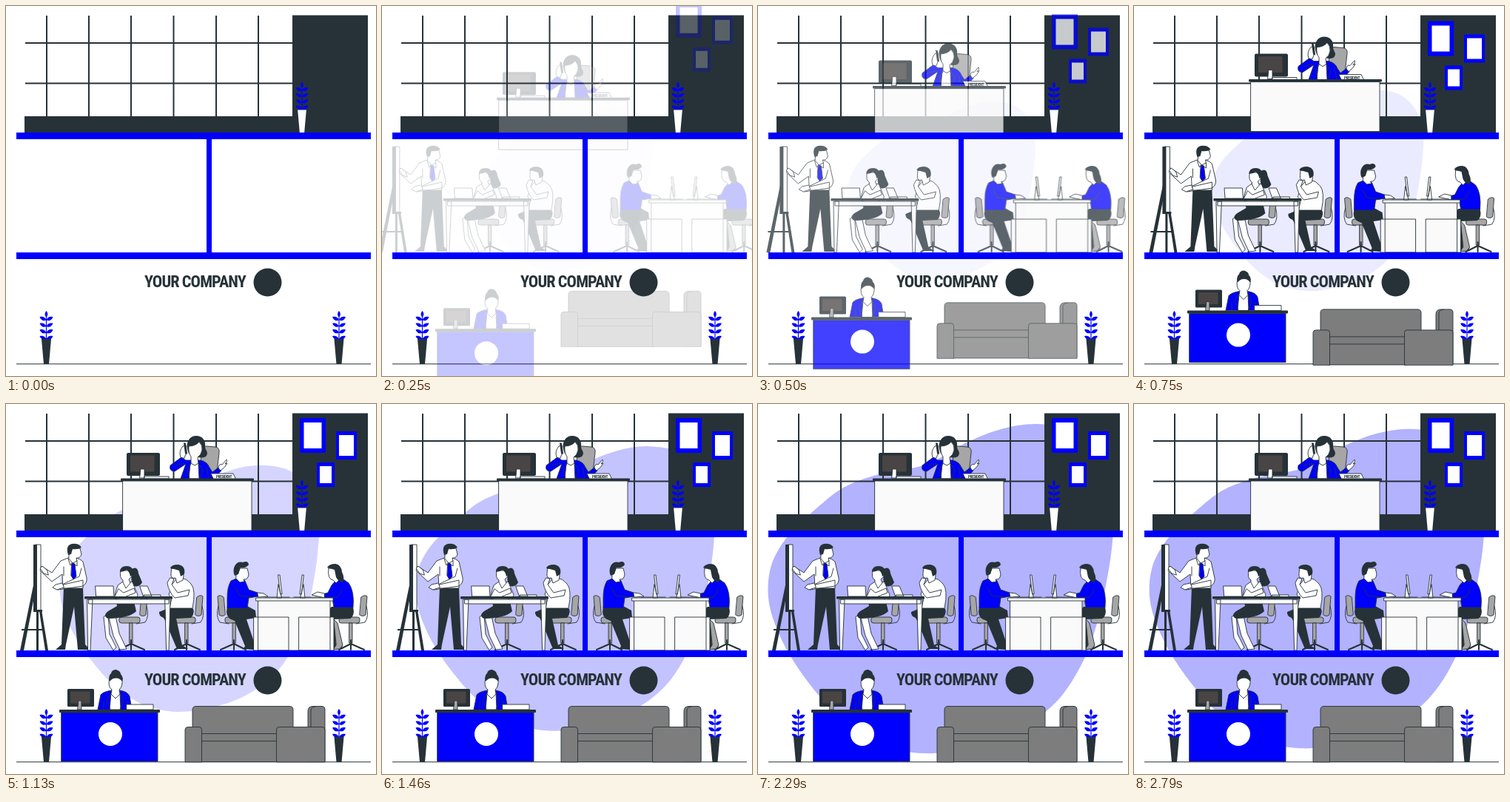
Animation, 500 px wide and 500 px high, one loop 2.83 s. Source, as an HTML page:

```html
<!DOCTYPE html>
<html lang="en">
<head>
<meta charset="utf-8">
<title>Office</title>
<style>
html, body { margin: 0; width: 100%; height: 100%; overflow: hidden; background: #fff; }
svg { display: block; width: 100vw; height: 100vh; }
.d { fill: #263238; }
.b { fill: #00f; }
.w { fill: #fff; }
.g { fill: #a6a6a6; }
.s { fill: #7d7d7d; }
.p { fill: #fafafa; }
.m { fill: #4a4545; }
.o { stroke: #263238; stroke-width: .9; stroke-linejoin: round; stroke-linecap: round; }
.l { fill: none; }
.title { font: 700 29px "Roboto Condensed", "Open Sans Condensed", Roboto, sans-serif; font-stretch: 75%; letter-spacing: -.04em; }
.plate { font: 700 5px "Roboto Condensed", "Open Sans Condensed", Roboto, sans-serif; font-stretch: 75%; letter-spacing: -.04em; }
</style>
</head>
<body>
<svg viewBox="0 0 500 500">
<defs>
  <g id="leaves" class="b">
    <path id="pair" d="M0-34C-2-38-5-39-9-38C-7-33-3-32 0-34C2-38 5-39 9-38C7-33 3-32 0-34Z"/>
    <use href="#pair" y="-8.6"/>
    <use href="#pair" y="-17.2"/>
    <use href="#pair" y="-25.8"/>
    <path d="M0-63C-3-67-2-69 0-72C2-69 3-67 0-63ZM-.6-64H.6V-33H-.6Z"/>
  </g>
  <path id="vase" d="M-6.5-34H6.5L3.5 0H-3.5Z"/>
  <!-- office chair, backrest on the right, floor at y = 0 -->
  <g id="chair" class="o">
    <path class="g" d="M12-72Q17-76 20-73L18-48Q14-45 10-48Z"/>
    <path class="l" d="M19-60Q23-46 17-38L5-36"/>
    <rect class="g" x="-18" y="-45" width="28" height="8" rx="3"/>
    <path class="g" d="M-4-37H0V-10H-4Z"/>
    <path class="l" stroke-width="2" d="M-2-14V-1M-18-1L-2-9L16-1"/>
  </g>
</defs>

<path id="blob" class="b"/>

<path class="l" stroke="#263238" stroke-width="2" d="M55 13V150M112 13V150M169 13V150M226.5 13V150M284 13V150M341 13V150M26 50H388M26 104.5H388"/>
<path class="d" d="M25 149H387V12.500H489V172H25Z"/>
<use href="#leaves" transform="translate(400 171) scale(.95)"/>
<use href="#vase" class="w" transform="translate(400 171) scale(.9)"/>

<g data-move="0 -30">
  <path class="b" d="M397 19H432V66H397ZM446 37H474V75H446ZM420 79H444V112H420Z"/>
  <path class="w" d="M402.500 25H426.500V60H402.500ZM450 42H470V70H450ZM424 84H440V107H424Z"/>
</g>

<g data-move="0 30">
  <path class="g o" d="M264 64Q264 56 271 57L283 58Q289 59 288 66L284 101H262Z"/>
  <path class="d" d="M245 61C243 50 249 43 257 43C266 43 270 50 269 57C269 63 275 65 270 71Q264 74 258 71L247 67Z"/>
  <path class="b o" d="M236 101L243 81L228 91Q220 91 222 83L237 72L243 76L250 76L263 76Q272 78 275 86L279 92L288 85L291 90L281 101Z"/>
  <path class="w o" d="M249 81L247 101H261L260 80L255 77Z"/>
  <path class="w o" d="M247 57Q256 57 261 51Q266 56 265 62Q264 69 259 72L260 80L255 83L250 80V71Q246 66 247 57Z"/>
  <path class="w o" d="M236 72Q233 64 239 57L243 56L244 65L241 73Z"/>
  <path class="d" d="M240 52L243 53L245 68L242 67Z"/>
  <path class="w o" d="M287 86Q288 80 292 82L298 75Q300 77 296 81L299 80Q297 85 290 90Z"/>
  <path class="l o" d="M250 81L245 89L248 101M260 80L266 89L262 101M229 83L241 80M271 86L274 100"/>
  <rect class="d" x="163" y="66" width="45" height="31" rx="2"/>
  <rect class="m o" x="168" y="69" width="33" height="23"/>
  <path class="w o" d="M182 88H187V100H181ZM187 98H220V101H187Z"/>
  <path class="w o" d="M277 94H307L311 102H281Z"/>
  <text class="plate d" x="284" y="100">PRESIDENT</text>
  <path class="p o" d="M158 104H332V171H158Z"/>
  <rect class="d" x="155" y="100.500" width="180" height="3.500" rx="1"/>
</g>

<g data-move="-30 0">
  <path class="d" d="M39 235L43 235L24 333H19ZM45 280L48 278L57 333H53ZM41 278H44V333H41Z"/>
  <path class="d" d="M21 304H52V306H21Z"/>
  <path class="w o" d="M40 190H47V280H40Z"/>
  <path class="d" d="M37 190H42V281H37ZM37 278H49V281H37Z"/>

  <path class="d" d="M78 247H104L105 275L107 325L114 332H97L92 274L81 325L80 332H67L75 325Z"/>
  <path class="w o" d="M84 208L74 212L62 228L48 219L46 225L62 240L76 230L77 249H104V238L78 244L68 245L64 248L70 251L104 246Q110 242 109 235L104 213Q100 209 95 208Z"/>
  <path class="w o" d="M55 224L49 219L46 222L51 229L57 231ZM76 242L67 244L63 248L69 251L78 248Z"/>
  <path class="w o" d="M86 195H100L102 203Q100 209 95 208L96 212L90 215L85 209Z"/>
  <path class="d" d="M84 204Q80 191 89 189Q99 188 102 194Q96 197 90 196L88 203Z"/>
  <path class="b o" d="M89 215L93 216L95 233L91 237L88 232Z"/>
  <path class="l o" d="M84 209L87 218L90 215L96 219V212M78 220V232M102 222L99 233L78 243"/>

  <use href="#chair" x="171" y="333"/>
  <path class="d" d="M168 224Q178 217 179 229L184 241Q181 248 172 246Q168 238 170 230Z"/>
  <path class="w o" d="M138 284L140 311L149 329L145 333L135 316L132 288ZM148 286L153 310L163 331L154 332L145 313L139 289Z"/>
  <path class="w o" d="M158 240L151 245L147 258L149 270H173L178 258L171 241Z"/>
  <path class="d" d="M149 263Q160 269 172 263L176 280Q168 289 138 290Q130 286 138 280L150 273Z"/>
  <path class="w o" d="M155 225H170V233L166 237L168 242L162 249L158 241V238Q153 236 155 225Z"/>
  <path class="d" d="M154 227Q154 219 163 219Q173 219 172 231L168 233Q167 227 163 224Q159 227 154 227Z"/>
  <path class="w o" d="M152 250L146 262L160 261L175 255L173 249L159 255Z"/>

  <use href="#chair" x="246" y="333"/>
  <path class="d" d="M224 274H251Q257 281 250 289L230 290L238 326L246 331H231L218 300L224 290L219 300L213 289Q206 286 207 281Z"/>
  <path class="w o" d="M231 236L224 244L220 258L224 262L221 276H252Q257 251 250 243Q244 236 238 235Z"/>
  <path class="w o" d="M224 222H237L240 232L239 238L231 242L229 235Q222 237 223 229Z"/>
  <path class="d" d="M222 222Q223 217 233 217Q243 219 241 230L236 233L234 225Q228 223 222 222Z"/>
  <path class="w o" d="M222 235L227 236L224 244L232 255L248 251L246 259L228 262Q220 254 218 242Z"/>
  <path class="w o" d="M121 246H145L146 260H122ZM181 246H191L197 260H186ZM187 258H209V261H187Z"/>
  <path class="p o" d="M110 264H117L114 333H111ZM215 264H222L220 333H217ZM112 264H220V270H112Z"/>
  <rect class="d" x="106" y="260" width="119" height="3.500" rx="1"/>
</g>

<g data-move="30 0">
  <use href="#chair" transform="translate(306 333) scale(-1 1)"/>
  <path class="d" d="M299 273H326L337 279L338 289L325 291L337 327L334 332L321 331L323 327L309 293Q298 290 298 281Z"/>
  <path class="b o" d="M311 236L304 239Q299 247 299 262V276H326L328 262L341 260L340 255L328 251L323 239Z"/>
  <path class="w o" d="M312 222H326L328 230Q327 238 321 237L322 240L316 241L311 236Z"/>
  <path class="d" d="M309 232Q306 225 309 219Q313 212 320 214Q327 211 328 217Q325 222 317 221L314 230Z"/>
  <path class="w o" d="M340 255L348 256L354 260L341 261Z"/>
  <path class="l o" d="M310 248L316 259L333 261"/>

  <use href="#chair" x="468" y="333"/>
  <path class="d" d="M440 274H469Q472 286 465 290L442 291L455 327L452 332H441L443 326L430 291L432 281Z"/>
  <path class="g o" d="M443 291L448 296L455 326L451 331L442 332L446 326Z"/>
  <path class="b o" d="M447 237L440 245L435 255L428 257L429 262L441 262L443 275H469Q471 253 463 242L456 237Z"/>
  <path class="w o" d="M436 222H450L452 236L446 242L442 238Q434 237 436 222Z"/>
  <path class="d" d="M434 221Q437 216 445 216Q453 217 454 227Q458 235 455 241Q449 240 446 234L444 224Z"/>
  <path class="w o" d="M430 256L421 254L413 258L430 262Z"/>
  <path class="l o" d="M455 250L448 261L430 262"/>
  <path class="p o" d="M341 265H438V333H341ZM335 288H382V333H335ZM396 288H443V333H396Z"/>
  <path class="p o" d="M338 262H442V266H338Z"/>
  <path class="w o" d="M368 231H370L373 257H371ZM368 244L366 262H372ZM402 231H400L397 257H399ZM402 244L404 262H398Z"/>
  <path class="l o" stroke-width="1.500" d="M350 261H383M389 261H427"/>
</g>

<path class="b" d="M14 171H493V180H278V333H493V342H14V333H271V180H14Z"/>
<path class="d" d="M14 483.200H493V484.200H14Z"/>
<use href="#leaves" x="54.500" y="484"/><use href="#vase" class="d" x="54.500" y="484"/>
<use href="#leaves" x="450" y="484"/><use href="#vase" class="d" x="450" y="484"/>

<g data-move="0 30">
  <path class="b o" d="M124 413L128 393Q131 389 142 387H154Q165 389 167 395L170 413Z"/>
  <path class="w o" d="M142 390L140 413H155L154 390Z"/>
  <path class="w o" d="M140 370H157Q158 382 153 386L154 392L148 398L142 392L143 386Q137 382 140 370Z"/>
  <path class="d" d="M140 375Q138 367 142 364Q143 359 149 359Q155 361 155 365Q159 369 157 375Q153 370 148 370Q143 371 140 375Z"/>
  <path class="l o" d="M142 390L136 400L141 413M154 390L159 400L154 413M132 402V412M164 402V410"/>
  <rect class="d" x="83" y="385" width="36" height="24" rx="1.500"/>
  <rect class="m o" x="87" y="388" width="27" height="17"/>
  <path class="g o" d="M98 401H102V413H97Z"/>
  <path class="w o" d="M163 406H199V413H163Z"/>
  <path class="b o" d="M75 417H205V483H75Z"/>
  <rect class="d" x="72" y="413" width="136" height="4" rx="1"/>
  <circle class="w" cx="141" cy="446" r="16"/>
</g>

<g data-move="0 -30" class="s o">
  <path d="M408 436V415Q408 408.500 415 408.500H427Q431 408.500 431 413V483H408Z"/>
  <path d="M412 436V414Q412 409 418 409"/>
  <path d="M252 450V413Q252 408.500 257 408.500H383Q388 408.500 388 413V450Z"/>
  <path d="M262 445.500H368V483.500H262ZM264 455.500H366"/>
  <path d="M242 483.500V440Q242 436.500 246 436.500H261Q264.500 436.500 264.500 440V483.500Z"/>
  <path d="M365.500 483.500V440Q365.500 436.500 369 436.500H427Q431 436.500 431 440V483.500Z"/>
</g>

<text id="title" class="title d" x="187">YOUR COMPANY</text>
<circle class="d" cx="353.500" cy="373.500" r="19"/>
</svg>
<script>
const LOOP = 2830, ENTER = 1000, GROW = 2800;
const blob = document.getElementById('blob');
const groups = [...document.querySelectorAll('[data-move]')].map(el => {
  const [x, y] = el.dataset.move.split(' ').map(Number);
  return { el, x, y };
});

// Closed smooth curve through a ring of points
function ring(pts) {
  const n = pts.length, at = i => pts[(i + n) % n];
  let d = 'M' + pts[0];
  for (let i = 0; i < n; i++) {
    const [a, b, c, e] = [at(i - 1), at(i), at(i + 1), at(i + 2)];
    const p = b.map((v, k) => v + (c[k] - a[k]) / 6);
    const q = c.map((v, k) => v - (e[k] - b[k]) / 6);
    d += `C${p} ${q} ${c}`;
  }
  return d + 'Z';
}

blob.setAttribute('d', ring([
  [374, 34], [424, 44], [459, 78], [474, 130], [472, 185], [465, 235], [453, 290],
  [433, 345], [398, 398], [345, 437], [285, 458], [225, 465], [168, 453], [118, 421],
  [79, 379], [48, 334], [28, 290], [21, 255], [25, 220], [40, 190], [61, 166],
  [86, 143], [120, 117], [165, 100], [228, 87], [275, 61], [325, 41]
]));

const bez = (s, a, b) => 3 * (1 - s) * (1 - s) * s * a + 3 * (1 - s) * s * s * b + s * s * s;

// Cubic easing that overshoots slightly before settling
function ease(x) {
  if (x >= 1) return 1;
  let lo = 0, hi = 1;
  for (let i = 0; i < 24; i++) {
    const mid = (lo + hi) / 2;
    if (bez(mid, .36, .5) < x) lo = mid; else hi = mid;
  }
  return bez(lo, -.01, 1.38);
}

const clamp = v => Math.max(0, Math.min(1, v));

function draw(t) {
  const p = ease(t / ENTER), k = ease(t / GROW);
  for (const { el, x, y } of groups) {
    el.setAttribute('transform', `translate(${x * (1 - p)} ${y * (1 - p)})`);
    el.setAttribute('opacity', clamp(p));
  }
  blob.setAttribute('transform', `translate(249 249) scale(${.5 + .5 * k}) translate(-249 -249)`);
  blob.setAttribute('opacity', .3 * clamp(k));
}

// Pick the type size that fills the sign, centred on its line
const title = document.getElementById('title');
const size = Math.min(29.5, 29 * 137 / title.getComputedTextLength());
title.style.fontSize = size + 'px';
title.setAttribute('y', 372.5 + .357 * size);

const start = performance.now();
function tick() {
  draw((performance.now() - start) % LOOP);
  requestAnimationFrame(tick);
}
draw(0);
requestAnimationFrame(tick);
</script>
</body>
</html>
```
